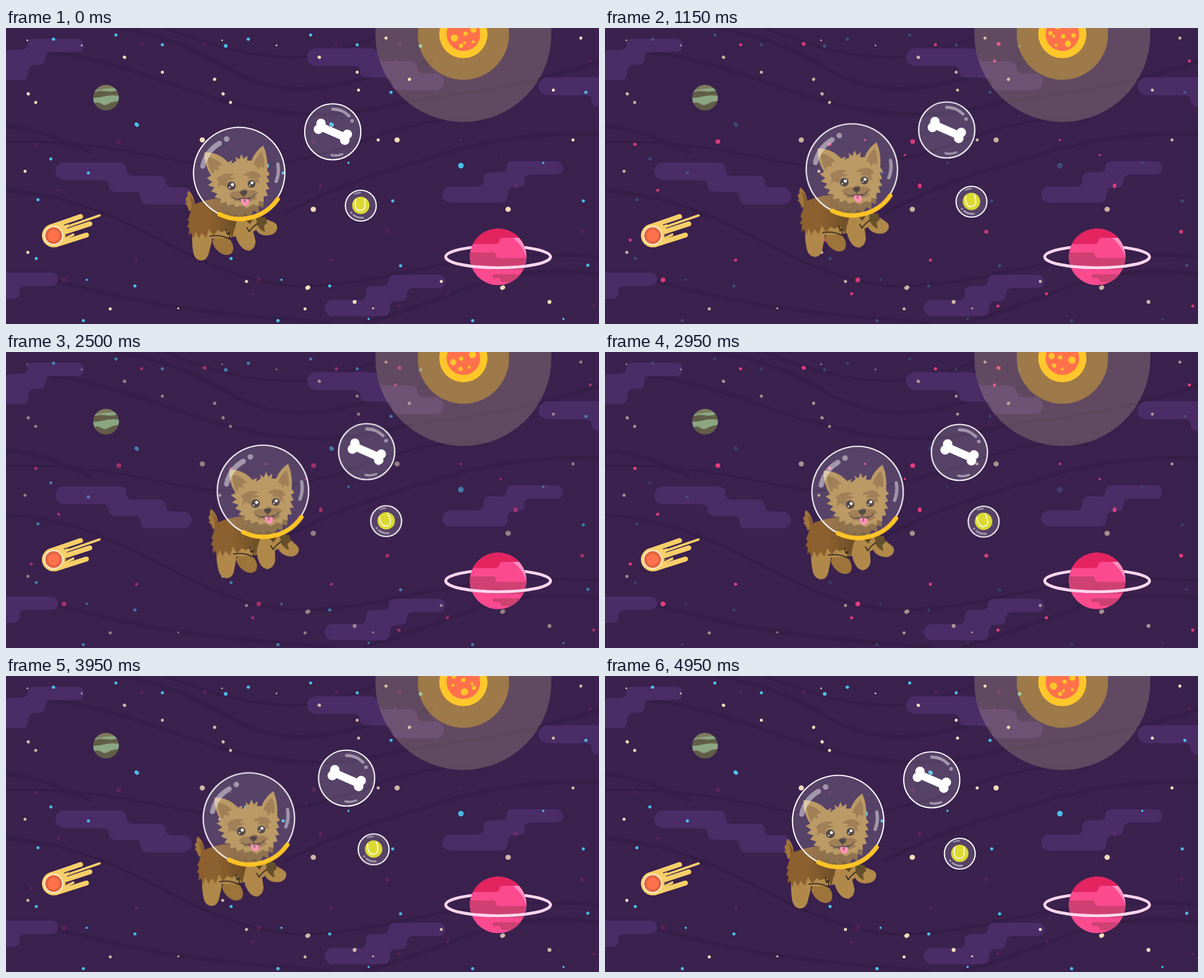
Recreate the animation shown at these times as an HTML page without scripts. Size 1058x529 px, loop 5000 ms.

```html
<!DOCTYPE html>
<html lang="en">
<head>
<meta charset="utf-8">
<title>Space puppy</title>
<style>
html, body { margin: 0; width: 100%; height: 100%; overflow: hidden; background: #3a214e; }
svg { display: block; width: 100%; height: 100%; }
.line { fill: none; stroke-linecap: round; stroke-linejoin: round; }
.waves { stroke: #341d46; stroke-width: 6; }
.clouds { fill: #4a2c67; }
.shine { stroke: #fff; stroke-opacity: .45; }
.glass { fill: #fff; fill-opacity: .15; stroke: #fff; stroke-width: 2.2; }
.tan { fill: #b0894a; }
.shade { fill: #916a3b; }

.beige, .blue, .pink, .craters, .dog, .bone, .ball, .seam, .tail, .hind, .fore, .paw, .head {
  animation: 5s linear infinite;
}
.beige { stroke: #f5dfbb; animation-name: dim; }
.blue { stroke: #4dc1ea; animation-name: blink; }
.pink { stroke: #ec3f80; animation-name: glow; }
@keyframes dim { 0%, 99%, 100% { opacity: 1 } 50% { opacity: .5 } }
@keyframes blink { 0%, 40%, 80%, 100% { opacity: 1 } 20%, 60% { opacity: .15 } }
@keyframes glow { 0%, 40%, 80%, 100% { opacity: .15 } 20%, 60% { opacity: 1 } }

.craters { transform-origin: 816px 11px; animation-name: spin; }
@keyframes spin { 99%, 100% { transform: rotate(360deg) } }

.dog { --to: translate(42.5px, -11px); animation-name: drift; }
.tail { --to: rotate(-5deg); transform-origin: 333px 322px; animation-name: drift; }
.hind { --to: rotate(-4deg); transform-origin: 345px 362px; animation-name: drift; }
.fore { --to: rotate(13deg); transform-origin: 424px 350px; animation-name: drift; }
.paw { --to: rotate(21deg); transform-origin: 450px 350px; animation-name: drift; }
.head { --to: rotate(1deg); transform-origin: 418px 320px; animation-name: drift; }
@keyframes drift {
  0% { transform: none; animation-timing-function: cubic-bezier(.333, .333, .667, 1) }
  50% { transform: var(--to) }
  99%, 100% { transform: none }
}
.bone { animation-name: bone; }
@keyframes bone {
  0% { transform: none; animation-timing-function: cubic-bezier(.333, 0, .667, 1) }
  50% { transform: translate(60.5px, -7.5px) }
  99%, 100% { transform: none }
}
.ball { --to: translate(45.3px, -15.3px); animation-name: ball; }
.seam { --to: rotate(-20deg); transform-origin: 633px 317px; animation-name: ball; }
@keyframes ball {
  0% { transform: none }
  50% { transform: var(--to); animation-timing-function: cubic-bezier(.333, 0, .667, .667) }
  99%, 100% { transform: none }
}
</style>
</head>
<body>
<svg viewBox="0 0 1058 529" preserveAspectRatio="none">
  <defs>
    <path id="rise" d="M50 19H127A12 12 0 0 1 127 43H82Q70 43 70 54.5Q70 66 58 66H52Q40 66 40 79Q40 93 28 93H-62A14.5 14.5 0 0 1-62 64H-14Q-3 64-3 52Q-3 39 9 39H26Q38 39 38 30Q38 19 50 19z"/>
    <path id="fall" d="M104 240H200Q215 240 215 252Q215 264 227 264H270Q285 264 285 275Q285 285 297 285H317A15 15 0 0 1 317 315H252Q240 315 240 304Q240 293 228 293H198Q183 293 183 282Q183 272 171 272H104A16 16 0 0 1 104 240z"/>
    <linearGradient id="fur" gradientUnits="userSpaceOnUse" x1="340" y1="0" x2="432" y2="0">
      <stop offset=".25" stop-color="#8c602f"/><stop offset="1" stop-color="#604724"/>
    </linearGradient>
    <clipPath id="moon"><circle cx="178.500" cy="124.500" r="23"/></clipPath>
    <clipPath id="giant"><circle cx="878" cy="409" r="50.500"/></clipPath>
  </defs>

  <rect width="1058" height="529" fill="#3a214e"/>
  <g class="line waves">
    <path d="M0 45C90 35 150 55 210 72S350 125 450 144S620 154 690 137S880 120 1058 60"/>
    <path d="M195 0C290 15 340 40 400 75S530 118 610 98S700 70 760 60"/>
    <path d="M285 0C370 35 440 52 510 52S600 35 660 18" stroke-width="4"/>
    <path d="M0 176C60 180 100 200 150 222"/>
    <path d="M0 203C160 202 240 225 320 240S470 248 560 226S740 150 860 165" stroke-width="4"/>
    <path d="M0 291C110 296 200 340 270 376S430 462 530 461S700 437 780 423S950 400 1058 409" stroke-width="5"/>
    <path d="M500 330C610 270 700 250 780 225S960 185 1058 190"/>
    <path d="M95 453C190 480 270 495 350 505S500 522 580 527"/>
    <path d="M640 527C720 505 790 475 850 455S990 430 1058 440"/>
  </g>

  <g class="clouds">
    <use href="#rise"/>
    <use href="#rise" x="-46" y="418"/>
    <use href="#rise" x="645" y="422"/>
    <use href="#rise" x="855" y="219"/>
    <use href="#fall"/>
    <use href="#fall" x="449" y="-204"/>
    <use href="#fall" x="862" y="-152"/>
  </g>

  <!-- each star set appears twice -->
  <g class="line beige">
    <g id="sand">
      <path stroke-width="3" d="M38 22h0M135 31h0M307 501h.8"/>
      <path stroke-width="5.400" d="M211 52l.8 .6M279 79h0M372 92l.4-.6M40 118l-.5-.6M53 133h0M34 256h0M39 401h0M186 502h0M429 453h0M629 111h0M664 200h0M678 18h0"/>
      <path stroke-width="7" d="M537.500 464.500l2-1M622 489.500h0"/>
      <path stroke-width="9" d="M548 324h.6M350 200h.4"/>
    </g>
    <use href="#sand" x="347.600"/>
  </g>
  <g class="line blue">
    <g id="ice">
      <path stroke-width="4" d="M611 241h0M144 450h0M647 520h0"/>
      <path stroke-width="5.600" d="M85 20h-.5M196 12.500h0M279 30h0M687 115h0M80 234h0M147 259h0M57 307h0M54 412h0M230 461h0M138 523h0M485 523h0"/>
      <path stroke-width="6.600" d="M392 32h0M232.500 172l1.500 1.300"/>
      <path stroke-width="10" d="M464 246h0"/>
    </g>
    <use href="#ice" x="347.600"/>
    <path stroke-width="5.600" d="M690 309h0M1030 309h0M704 425h0M1038 424h0"/>
  </g>
  <g class="line pink">
    <g id="rose">
      <path stroke-width="4.200" d="M464 200h0M535 227h0"/>
      <path stroke-width="5.600" d="M242 30h0M53 208h.6M94 290h0M45 379h0M233 415h0M440 475h0M695 59h0M701 497h0"/>
      <path stroke-width="6.400" d="M354 28l1 .6M561.500 281v2M680 364h.6"/>
      <path stroke-width="8" d="M201 203h.6M103 450.500l.8-.5"/>
    </g>
    <use href="#rose" x="347.600"/>
  </g>

  <g>
    <circle cx="816" cy="11" r="157" fill="#fff0b0" opacity=".2"/>
    <circle cx="816" cy="11" r="81.500" fill="#ffc426" opacity=".39"/>
    <circle cx="816" cy="11" r="43" fill="#ffc72b"/>
    <circle cx="816" cy="11" r="30" fill="#ff714b"/>
    <g class="line craters" stroke="#ffc72b">
      <path stroke-width="13" d="M800 18h0"/>
      <path stroke-width="11" d="M834 3h0"/>
      <path stroke-width="7.600" d="M820 10h0M812 32h0M820.500-8.500h0"/>
      <path stroke-width="5.200" d="M818 26.500h0M834 24.500h0M805-5h0"/>
    </g>
  </g>

  <g clip-path="url(#moon)">
    <path fill="#8aa682" d="M155 101h47v48h-47z"/>
    <path fill="#7c7a5d" d="M155 101h47v6Q175 107 155 113z"/>
    <path fill="#625d48" d="M155 116Q164 111 177 113T202 111V121Q187 119 176 122T155 125zM155 137Q162 130 169 135T182 136T202 130V149H155z"/>
  </g>

  <g class="line" stroke="#f8cf69">
    <path stroke-width="4" d="M100 358L167 335"/>
    <path stroke-width="9" d="M82 355L133 337M97 367L149.500 350M90 387L143.500 370"/>
    <path stroke-width="6" d="M98 378L119 369"/>
    <path fill="#f8cf69" stroke="none" d="M79 351L112 340V349L103 372L112 381L91 391z"/>
    <path stroke="#3a214e" stroke-width="1.600" d="M104 352L134 342M104 374L122 365"/>
    <g stroke="none">
      <circle cx="85" cy="371" r="21" fill="#f8cf69"/>
      <circle cx="85" cy="371" r="17.500" fill="#fdebc8"/>
      <circle cx="85" cy="371" r="15" fill="#e2643f"/>
      <circle cx="85" cy="371" r="10.500" fill="#ff724b"/>
    </g>
  </g>

  <g>
    <ellipse class="line" cx="878" cy="409" rx="93.500" ry="19.500" stroke="#fcd6ec" stroke-width="5"/>
    <g clip-path="url(#giant)">
      <path fill="#fc4a8f" d="M820 350h120v120H820z"/>
      <path fill="#ff8fc0" d="M902 373H940V415L929 412Q924 390 902 373z"/>
      <path fill="#e3245f" d="M820 350H940V375H888Q880 375 880 381Q880 386 872 386H820z"/>
      <path fill="#cf4173" d="M820 401H868Q874 401 874 406Q874 411 882 411H940V432H868Q861 432 861 428Q861 424 853 424H820zM872 440H930V454H887Q882 454 882 450.500Q882 447 876 447H872Q868 447 868 443.500Q868 440 872 440z"/>
    </g>
    <path class="line" d="M784.500 409A93.500 19.500 0 0 0 971.500 409" stroke="#fcd6ec" stroke-width="5"/>
  </g>

  <g class="ball">
    <circle class="glass" cx="633" cy="317.500" r="27.500"/>
    <g class="seam">
      <circle cx="633" cy="317" r="15.500" fill="#dcda32"/>
      <path class="line" d="M624 306C621 321 626 327 633 326S642 320 640 305" stroke="#fff" stroke-width="1.700"/>
    </g>
    <g class="line shine">
      <path stroke-width="3.500" d="M620 334Q627 340 637 339"/>
      <path stroke-width="2.500" d="M622 296.500Q626 294.500 632 294.500"/>
      <path stroke-width="4" d="M616 330h0"/>
    </g>
  </g>

  <g class="bone">
    <circle class="glass" cx="583" cy="185.500" r="50"/>
    <g class="line" stroke="#fff">
      <path stroke-width="14" d="M563 177L603 194.500"/>
      <path stroke-width="17" d="M562 170.500h0M557.500 181h0M609 190h0M604.500 200.500h0"/>
    </g>
    <g class="line shine">
      <path stroke-width="5.500" d="M583 145A41 41 0 0 1 612 157"/>
      <path stroke-width="6.500" d="M617.500 166h0"/>
      <path stroke-width="4" d="M581 227Q590 229.500 600 225.500"/>
    </g>
  </g>

  <g class="dog">
    <g class="tail">
      <path fill="#a0763c" d="M326 291Q338 301 337 324L326 327Q325 318 319 313L323 312Q317 304 324 301Q322 295 326 291z"/>
      <path fill="#855b2c" d="M327 299Q337 306 337 324L330 326Q333 312 327 299z"/>
    </g>
    <path fill="#9d743a" d="M372 372Q390 366 401 380Q409 393 403 402Q395 409 384 403Q371 395 368 382z"/>
    <path class="tan paw" d="M444 340Q462 340 472 345Q484 348 484 357Q483 365 475 369Q462 373 453 368Q441 361 444 340z"/>
    <path class="tan" d="M335 318Q380 300 430 335L460 338Q452 365 430 367Q395 378 365 376L338 374Q330 360 335 318z"/>
    <g class="hind tan">
      <path d="M334 356Q348 345 368 363Q369 378 363 397Q360 415 349 415.500Q337 415 334 401Q330 380 334 356z"/>
    </g>
    <path fill="url(#fur)" d="M331 318Q350 307 382 304L444 337L434 352L430 346L424 359L419 352L412 366L408 357L404 375L395 361L384 365L378 361L370 371L362 359L357 375L349 366L344 376L338 364L335 377L330 366L326 371L327 357L323 356L327 347L324 343Q329 333 331 318z"/>
    <path class="fore tan" d="M411 346Q430 338 438 356Q442 366 445 380Q446 393 435 398Q424 399 416 386Q405 371 411 346z"/>
    <path fill="#65502b" d="M446 338H463L466 348L460 354L462 365Q453 361 448 352z"/>
    <path class="line" stroke="#2d2420" stroke-width="1.800" d="M364 372Q384 369 398 377M393 360L395 369L398 365L399 374M430 357L434 364Q440 355 448 350"/>

    <g class="head">
      <path fill="#7c5b31" d="M383 306L460 300L459 321L451 318L451 331L442 326L435 337L426 330L417 340L411 331L402 336L399 326L390 328L391 319L383 319z"/>
      <path class="tan" d="M354 222Q380 222 396 240L404 236L402 243L411 237L409 230L416 235L420 225L424 234L431 228L430 237L438 237Q445 219 459 210Q468 230 466 255L471 262L465 265L470 275L464 277L470 288L463 289L467 300L459 301L460 311L451 309L450 318L441 315L430 322L421 317L409 320L406 314L394 318L394 311L382 313L384 305L372 303L377 296L366 292L372 285L360 281L368 275L358 268L366 264Q353 244 354 222z"/>
      <g class="shade">
        <path d="M360 231Q375 232 386 245L378 247L381 255L372 253L369 262Q359 246 360 231z"/>
        <path d="M456 221Q463 236 460 251L454 247L450 254L446 245L441 245Q446 230 456 221z"/>
        <path d="M376 270Q386 257 408 261L398 266L410 269L396 273L392 284L384 280L378 286L380 275z"/>
        <path d="M423 264Q433 252 449 258L456 266L449 268L453 278L445 276L443 270L430 269L435 264z"/>
        <path d="M397 298Q407 289 417 292Q425 284 433 290Q446 288 451 296L444 299L448 305L437 310L424 309L406 310L408 304z"/>
      </g>
      <g fill="#352a28">
        <circle cx="402" cy="282" r="7.800"/>
        <circle cx="438" cy="278.500" r="7"/>
        <path d="M417 293Q423 288 430 291Q432 296 425 300Q419 300 417 293z"/>
        <path d="M415 304Q424 307 435 302Q435 311 429 315Q419 315 415 304z"/>
      </g>
      <path fill="#ff80aa" d="M418 306Q425 304 433 305Q436 317 427 318Q420 316 418 306z"/>
      <path class="line" stroke="#40302a" stroke-width="1.600" d="M402 302Q412 309 424 304Q438 308 444 297M424 299V304M426 306V311"/>
      <g fill="#fff">
        <circle cx="404" cy="280" r="2.700"/><circle cx="399" cy="285" r="1.300"/>
        <circle cx="439" cy="276.500" r="2.600"/><circle cx="435" cy="281" r="1.200"/>
      </g>
    </g>

    <circle class="glass" cx="416" cy="259" r="81.500"/>
    <g class="line shine">
      <path stroke-width="9" d="M351 247Q357 220 381 206"/>
      <path stroke-width="10" d="M393.500 198.500h0"/>
      <path stroke-width="6" d="M485 243Q488 259 482 274"/>
    </g>
    <path class="line" stroke="#ffc426" stroke-width="8" d="M381 333A82 82 0 0 0 484.500 306"/>
  </g>
</svg>
</body>
</html>
```
